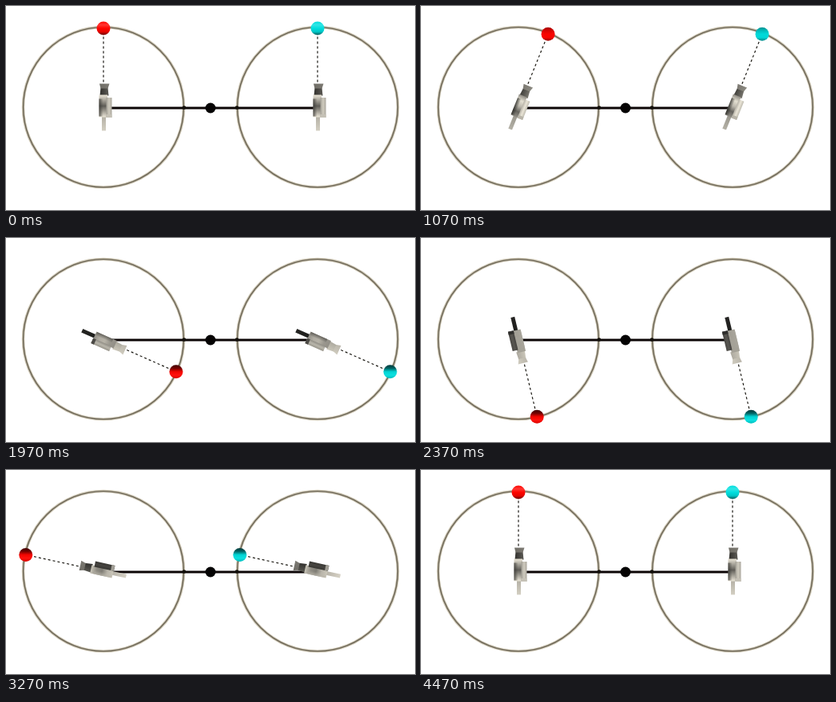
An HTML page with a canvas that plays this animation: 512x256 px, repeating every 5000 ms.

```html
<!DOCTYPE html>
<html lang="en">
<head>
<meta charset="utf-8">
<title>Orbiting balls</title>
<style>
html, body { margin: 0; width: 100%; height: 100%; overflow: hidden; background: #fff; }
canvas { display: block; }
</style>
</head>
<body>
<canvas id="stage" width="512" height="256"></canvas>
<script>
const ctx = document.getElementById('stage').getContext('2d');
const LOOP = 5000, START = 500, STEPS = 120;
const CY = 127.5, ORBIT = 99.5, CENTERS = [122, 390];
const LIGHT = 140; // direction the light comes from, degrees clockwise from up
const RED = [255, 5, 0], CYAN = [0, 222, 222];

const rad = deg => deg * Math.PI / 180;
const mix = (a, b, u) => a + (b - a) * u;
const tone = (g, a = 1) => `rgba(${g | 0},${g * 0.98 | 0},${g * 0.92 | 0},${a})`;
const tint = (rgb, k) => `rgb(${rgb.map(v => k > 1 ? mix(v, 255, k - 1) : v * k).join()})`;

// Grey level of a face whose normal points at the given heading
const lit = deg => 125 + 100 * Math.cos(rad(deg - LIGHT));

function heading(t) {
  const ticks = Math.floor((t - START) / 10);
  const step = t < START ? 0 : Math.floor((ticks * 3 + 1) / 10) + 1;
  const u = Math.min(step / STEPS, 1);
  return 360 * u * u * (3 - 2 * u);
}

function fade(x0, y0, x1, y1, colors) {
  const g = ctx.createLinearGradient(x0, y0, x1, y1);
  colors.forEach((c, i) => g.addColorStop(i / (colors.length - 1), c));
  return g;
}

function poly(points, fill) {
  ctx.beginPath();
  points.forEach(([x, y]) => ctx.lineTo(x, y));
  ctx.closePath();
  ctx.fillStyle = fill;
  ctx.fill();
}

function box(x, y, w, h, fill) {
  ctx.fillStyle = fill;
  ctx.fillRect(x, y, w, h);
}

function disc(x, y, r, fill) {
  ctx.beginPath();
  ctx.arc(x, y, r, 0, 2 * Math.PI);
  ctx.fillStyle = fill;
  ctx.fill();
}

function ring(x, r, width, color) {
  ctx.beginPath();
  ctx.arc(x, 127, r, 0, 2 * Math.PI);
  ctx.lineWidth = width;
  ctx.strokeStyle = color;
  ctx.stroke();
}

// Glossy body: a dark band that slides along the axis and fades when turned away
function bodyTones(deg) {
  const depth = 35 * (1 + Math.cos(rad(deg)));
  return [0, 0.25, 0.5, 0.75, 1].map(u =>
    tone(165 + depth * Math.cos(2 * Math.PI * u - rad(deg * 5))));
}

function camera(deg) {
  const front = lit(deg), right = lit(deg + 90), back = lit(deg + 180), left = lit(deg - 90);
  const hood = mix(front, 200, 0.5);
  box(-2, 11, 5, 18, fade(0, 11, 0, 29, [tone(back * 0.9), tone(back * 1.05)]));
  poly([[-3.5, -25], [5.5, -25], [6.5, -15], [-4.5, -15]],
    fade(-4, 0, 6, 0, [tone(mix(front, left, 0.3)), tone(mix(front, right, 0.3))]));
  poly([[-5, -30], [7.5, -30], [5.5, -24], [-3.5, -24]],
    fade(-5, 0, 7, 0, [tone(hood * 0.9), tone(hood)]));
  box(-5.5, -16, 10.5, 28, fade(0, -16, 0, 12, bodyTones(deg)));
  box(-5.5, -11, 5, 22, fade(-5.5, 0, -0.5, 0, [tone(left, 0.8), tone(left, 0)]));
  box(3.5, -12.5, 7, 25, fade(3.5, 0, 10.5, 0, [tone(right * 0.85), tone(right * 1.1), tone(right * 0.9)]));
  box(3.5, 8.5, 7, 4, tone(mix(right, back, 0.7)));
}

// The upper half falls into shade once the ball has left the top
function ball(x, y, rgb, deg) {
  const shade = Math.min(1, 2.5 * Math.abs(Math.sin(rad(deg / 2))));
  const g = ctx.createLinearGradient(x, y - 8.5, x, y + 8.5);
  g.addColorStop(0, tint(rgb, mix(1, 0.25, shade)));
  g.addColorStop(0.25, tint(rgb, mix(1.2, 0.45, shade)));
  g.addColorStop(0.5, tint(rgb, mix(1, 0.95, shade)));
  g.addColorStop(0.75, tint(rgb, mix(0.9, 1.05, shade)));
  g.addColorStop(1, tint(rgb, mix(0.4, 0.85, shade)));
  disc(x, y, 8.5, g);
}

function orbit(cx, deg, rgb) {
  const a = rad(deg);
  ctx.save();
  ctx.translate(cx, CY);
  ctx.rotate(a);
  ctx.beginPath();
  ctx.moveTo(0, -29);
  ctx.lineTo(0, -ORBIT);
  ctx.setLineDash([3, 3]);
  ctx.lineDashOffset = 3;
  ctx.lineWidth = 1.2;
  ctx.strokeStyle = '#1c1a14';
  ctx.stroke();
  ctx.setLineDash([]);
  camera(deg);
  ctx.restore();
  ball(cx + ORBIT * Math.sin(a), CY - ORBIT * Math.cos(a), rgb, deg);
}

function draw(t) {
  const deg = heading(t);
  box(0, 0, 512, 256, '#fff');
  for (const x of CENTERS) {
    ring(x, 100.5, 3.5, '#cbc4b1');
    ring(x, 100.4, 1.4, '#6b6556');
  }
  box(122, 126.5, 268, 3, '#0c0606');
  disc(223, 127.5, 2.3, '#14100c');
  disc(289, 127.5, 2.3, '#14100c');
  disc(256, 128, 6.5, '#050303');
  orbit(CENTERS[0], deg, RED);
  orbit(CENTERS[1], deg, CYAN);
}

function tick() {
  draw(performance.now() % LOOP);
  requestAnimationFrame(tick);
}
tick();
</script>
</body>
</html>
```
